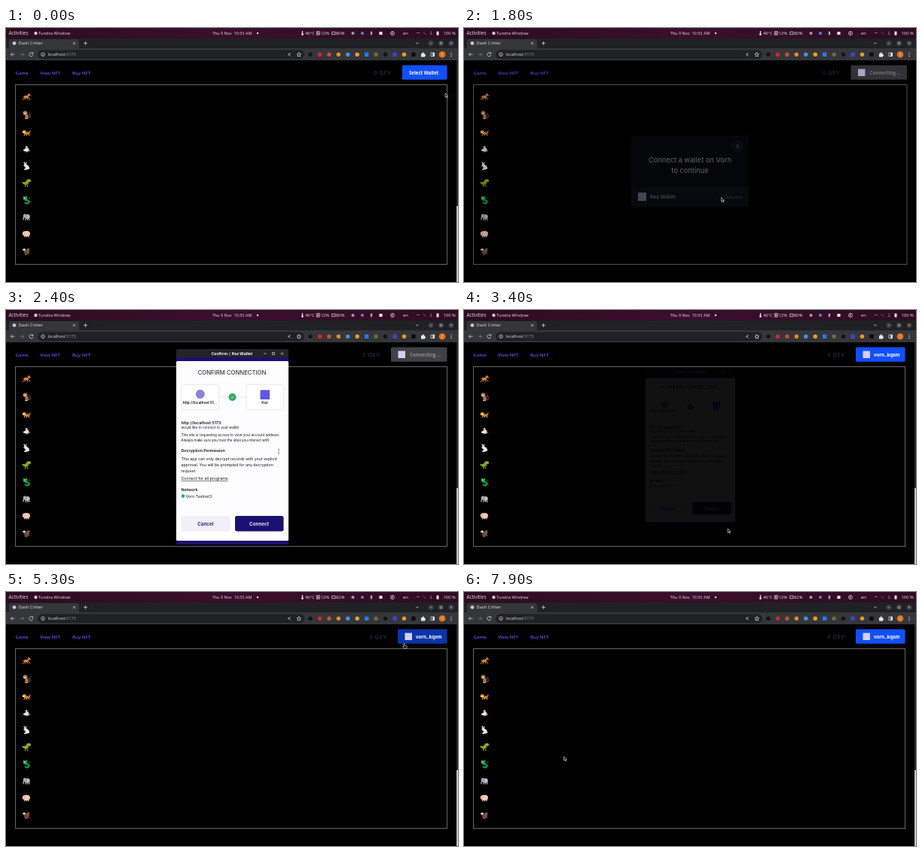
These frames come from a looping animation (600 by 338 pixels, 8 s). An HTML page:

```html
<!DOCTYPE html>
<html lang="en">
<head>
<meta charset="utf-8">
<title>Wallet demo</title>
<style>
html, body { margin: 0; width: 100%; height: 100%; overflow: hidden; background: #000; }
svg { display: block; width: 100vw; height: 100vh; }
text { font-family: "Open Sans", "Noto Sans", sans-serif; font-size: 5.8px; fill: #e6e0e4; white-space: pre; }
.ui text { font-family: Inter, sans-serif; font-size: 5.3px; fill: #15151c; }
.ui .small { font-size: 4.6px; }
.ui .body { font-size: 5.2px; }
.ui .w { fill: #fff; }
.b { font-weight: 600; }
.mid { text-anchor: middle; }
.end { text-anchor: end; }
.line { fill: none; stroke: #d4d4d8; stroke-width: .8; }
#nav text { font-size: 6.1px; font-weight: 600; fill: #5c58f4; }
</style>
</head>
<body>
<svg viewBox="0 0 600 338" preserveAspectRatio="none">
  <defs>
    <linearGradient id="panel"><stop stop-color="#2e0b22"/><stop offset=".5" stop-color="#3a0f2b"/><stop offset="1" stop-color="#2f0c24"/></linearGradient>
    <path id="controls" class="line" d="M-1.5 0h3M9.6-1.4h2.8v2.8h-2.8zM21.1-1.4l2.8 2.8m0-2.8l-2.8 2.8"/>
  </defs>

  <!-- page -->
  <rect width="600" height="338"/>
  <g id="nav">
    <text x="12.5" y="61.6">Game</text><text x="45" y="61.6">View NFT</text><text x="88" y="61.6">Buy NFT</text>
  </g>
  <rect id="frame" x="12.5" y="75.5" height="239" fill="none" stroke="#666"/>
  <g id="animals"></g>
  <g id="account">
    <text id="balance" class="b end" y="62" style="font-size:7px;letter-spacing:.7px;fill:#273040">0 QEV</text>
    <rect id="button" y="49.6" height="19.2" rx="1.6"/>
    <rect id="mark" y="54.5" width="9.5" height="9.5" fill="#d3cffa"/>
    <text id="label" y="61.5" style="font-size:6.1px;font-weight:700"></text>
  </g>
  <g id="scrollbar">
    <rect x="598" y="43" width="2" height="295" fill="#2a2a2a"/>
    <rect x="598" y="237" width="2" height="101" fill="#c4c4c4"/>
  </g>

  <!-- wallet picker -->
  <g id="modal" class="ui">
    <rect y="43" width="600" height="295" opacity=".62"/>
    <rect x="222" y="143" width="156" height="96" rx="3" fill="#10141f"/>
    <rect id="row" x="222" y="212" width="156" height="25" fill="#1a1f2e"/>
    <circle cx="363.5" cy="157.5" r="7.5" fill="#1c2133"/>
    <path class="line" d="M361.2 155.2l4.6 4.6m0-4.6l-4.6 4.6"/>
    <text x="300" y="178.6" class="mid w" style="font-size:9.2px;font-weight:500">Connect a wallet on Vorn</text>
    <text x="300" y="192.6" class="mid w" style="font-size:9.2px;font-weight:500">to continue</text>
    <rect x="231" y="219" width="11" height="11" fill="#d3cffa"/>
    <text x="247" y="227" class="w" style="font-size:6.8px">Kez Wallet</text>
    <text x="369" y="226.5" class="end" style="fill:#8b8e96">Detected</text>
  </g>

  <!-- popup while loading -->
  <g id="blank">
    <path d="M228 312V63q0-2 2-2h140q2 0 2 2v249z" fill="#2b2e35"/>
    <path d="M228 70.5V63q0-2 2-2h140q2 0 2 2v7.5z" fill="#202124"/>
    <text x="231.5" y="67.8" style="font-size:5.3px;font-weight:700;fill:#fff">_crx_nebnhfamliijlghikdgcigoebonmoi...</text>
    <use href="#controls" x="342.5" y="65.8"/>
  </g>

  <!-- popup with the request -->
  <g id="confirm" class="ui">
    <path d="M226 64V54q0-2 2-2h145q2 0 2 2v10z" fill="#242427"/>
    <text x="300" y="60" class="mid w" style="font-family:'Open Sans',sans-serif;font-weight:700">Confirm | Kez Wallet</text>
    <use href="#controls" x="344" y="58"/>
    <rect x="226" y="63" width="149" height="249" fill="#1c1170"/>
    <rect x="226" y="68" width="149" height="239" rx="1.5" fill="#fdfdff"/>
    <text x="300" y="86.3" class="mid" style="font-size:7.75px">CONFIRM CONNECTION</text>
    <g fill="#fff" stroke="#dedee6" stroke-width=".7">
      <rect x="232.8" y="99.3" width="50" height="33.5" rx="2.5"/><rect x="319" y="99.3" width="50" height="33.5" rx="2.5"/>
      <path d="M283 116h36"/>
    </g>
    <circle cx="257.8" cy="112" r="6" fill="#8a83d8"/>
    <text x="257.5" y="124.6" class="mid b" style="font-size:4.7px">http://localhost:51...</text>
    <rect x="337.5" y="106.5" width="12.5" height="12.5" fill="#6355e0"/>
    <text x="343.5" y="124.6" class="mid b" style="font-size:4.7px">Kez</text>
    <circle cx="300.5" cy="116" r="5" fill="#2fa866"/>
    <path d="M298.6 116.2l1.4 1.4 2.4-2.8" fill="none" stroke="#fff" stroke-width=".8"/>
    <text x="232.5" y="151.6" class="b">http://localhost:5173</text>
    <text x="232.5" y="158.2" class="small">would like to connect to your wallet</text>
    <text x="232.5" y="168" class="small">This site is requesting access to view your account address.</text>
    <text x="232.5" y="175" class="small">Always make sure you trust the sites you interact with.</text>
    <text x="232.5" y="189" class="b">Decryption Permission</text>
    <text x="232.5" y="200" class="body">This app can only decrypt records with your explicit</text>
    <text x="232.5" y="208" class="body">approval. You will be prompted for any decryption</text>
    <text x="232.5" y="216" class="body">request.</text>
    <text x="232.5" y="226.3" text-decoration="underline">Connect for all programs</text>
    <text x="232.5" y="240.8" class="b">Network</text>
    <circle cx="235" cy="247.6" r="2.3" fill="#2b9fb0"/>
    <text x="238.8" y="249.5" class="body">Vorn Testnet3</text>
    <rect x="232.5" y="274" width="65" height="20.5" rx="2.5" fill="#f0f0f6"/>
    <text x="264.8" y="286.7" class="mid b" style="font-size:6.3px;fill:#1c1170">Cancel</text>
    <rect id="ok" x="304" y="274" width="64.5" height="20.5" rx="2.5"/>
    <text x="336" y="286.7" class="mid b w" style="font-size:6.3px">Connect</text>
  </g>

  <!-- desktop panel -->
  <rect width="600" height="14" fill="url(#panel)"/>
  <text x="3.5" y="9" style="font-size:6.3px">Activities</text>
  <circle cx="39.5" cy="7" r="2.2" fill="#cfc8cc"/>
  <text x="43" y="9">Tundra Window</text>
  <text x="300" y="9" class="mid" style="font-size:5.5px">Thu 9 Nov  10:53 AM</text>
  <circle cx="334" cy="7" r="1.2" fill="#fff"/>
  <path d="M393.5 4v4" stroke="#e6e0e4" stroke-width="1.3"/><circle cx="393.5" cy="8.6" r="1.4" fill="#e6e0e4"/>
  <text x="397" y="9">46°C</text>
  <path class="line" d="M412.3 4.6h4v4.6h-4zm1.3 1.5h1.4v1.6h-1.4z"/>
  <text x="417.5" y="9">12%</text>
  <path class="line" d="M432.6 5.2h4.4v3.4h-4.4z"/>
  <text id="memory" x="438" y="9"></text>
  <g id="tray"></g>
  <path class="line" d="M483.6 5.7l2.6 2.4-1.3 1.3V4.6l1.3 1.2-2.6 2.5"/>
  <circle class="line" cx="513" cy="7" r="2.5"/><path class="line" d="M513.6 5.5q-1-.2-1 .8v2.2m-.7-1.4h1.6"/>
  <text x="527" y="9">en</text>
  <path d="M545 6.5h4m5-1l3 3m7.2-4.2v3.4m-1.6 0q1.6 2 3.2 0" class="line" opacity=".6"/>
  <path d="M571.5 4.6h3v5h-3z" fill="#e6e0e4"/>
  <text x="580.5" y="9">100 %</text>

  <!-- browser -->
  <rect y="14" width="600" height="14" fill="#202124"/>
  <path d="M2 28q2 0 2-2v-8q0-3 3-3h87q3 0 3 3v8q0 2 2 2z" fill="#35363a"/>
  <rect y="27" width="600" height="16" fill="#35363a"/>
  <circle cx="11" cy="20.3" r="2.4" fill="#c9c9cd"/>
  <text x="16.5" y="22.4">Dash Critter</text>
  <path class="line" d="M89 18.8l3 3m0-3l-3 3M103 20.3h5m-2.5-2.5v5M544.3 19.5l1.7 1.7 1.7-1.7"/>
  <g fill="#3c3d41"><circle cx="564" cy="20.3" r="3.6"/><circle cx="577.5" cy="20.3" r="3.6"/><circle cx="591" cy="20.3" r="3.6"/></g>
  <path class="line" opacity=".7" d="M562.7 20.6h2.6M576.3 19.1h2.4v2.4h-2.4zM589.8 19.1l2.4 2.4m0-2.4l-2.4 2.4"/>
  <path class="line" d="M11.5 35.2h-5m2-2.2l-2.2 2.2 2.2 2.2M35.6 34a2.5 2.5 0 1 0 .2 2M35.8 32.4v1.8h-1.8"/>
  <path class="line" opacity=".4" d="M18.5 35.2h5m-2-2.2l2.2 2.2-2.2 2.2"/>
  <rect x="42" y="29.2" width="354" height="12" rx="6" fill="#202124"/>
  <circle class="line" cx="49" cy="35.2" r="2.3"/><path class="line" d="M49 34.8v1.6"/>
  <text x="55.5" y="37.3" style="font-size:5.5px">localhost<tspan fill="#9a9ca1">:5173</tspan></text>
  <path class="line" d="M377.6 33.4l-3.2 1.8 3.2 1.8M388.8 32.4l.8 2 2 .2-1.5 1.4.4 2-1.7-1-1.7 1 .4-2-1.5-1.4 2-.2z"/>
  <g id="addons"></g>
  <path d="M551 34h1.6q0-1.8 1.1-1.8t1.1 1.8h1.2v1.4q1.2 0 1.2 1t-1.2 1v1.2h-5z" fill="#e6e6e8"/>
  <path class="line" d="M564 33h4.6v4.6H564z"/><path d="M566.4 33h2.2v4.6h-2.2z" fill="#eee"/>
  <circle cx="579" cy="35.2" r="4.3" fill="#e8701a"/><text x="579" y="37" class="mid" style="font-size:5px">C</text>
  <path d="M591 32.5v6" stroke="#ddd" stroke-width="1.1" stroke-dasharray="1.1 1.2"/>

  <g id="cursor" fill="#111" stroke="#fff" stroke-width=".55">
    <path d="M0 0v5.2l1.3-1.1 1 2.1.9-.4-1-2H4z"/>
    <path d="M-.6 0q.6-.8 1.2 0v2l2.6.7q.8.3.6 1.2l-.5 2.3H0l-2-2.4q.2-1 1.4 0z"/>
    <path d="M-1.2-2.8h2.4M0-2.8v5.6m-1.2 0h2.4" stroke="#555"/>
  </g>
</svg>
<script>
const $ = id => document.getElementById(id);
const set = (id, attrs) => { for (const k in attrs) $(id).setAttribute(k, attrs[k]); };
const show = (id, opacity) => set(id, { opacity: +opacity, visibility: opacity > 0 ? 'visible' : 'hidden' });
const ramp = (t, a, b) => Math.min(1, Math.max(0, (t - a) / (b - a)));
const within = (t, a, b) => t >= a && t < b;

// Small figures, each drawn around its own centre
const shape = (d, fill) => `<path d="${d}" fill="${fill}"/>`;
const stroke = (d, color, w = .8) => `<path d="${d}" fill="none" stroke="${color}" stroke-width="${w}"/>`;
const oval = (x, y, rx, ry, fill) => `<ellipse cx="${x}" cy="${y}" rx="${rx}" ry="${ry}" fill="${fill}"/>`;
const animals = [
  [91.5, stroke('M2 1l2.4 1 .4 2M1 1.5l1.6 2.8M-2 1l-2 1.6-1 2M-2 1l.4 3.4', '#c07a3a', 1) + oval(-.2, .2, 3.4, 1.9, '#cf8546') + shape('M6-1.4L4-4.6 1.6-3.4V0l2-1.4 1.4.6z', '#cf8546') + stroke('M3.6-4.4Q2-3.6 1-1.4M-3.2-.6q-2-.4-2.6 1.6', '#6b3518', .9)],
  [115.5, stroke('M2.6 4q3.4 0 2.4-3t-1-3.4', '#a5714a', .9) + oval(.5, 2, 2.4, 3, '#a5714a') + oval(-1.5, -2.5, 3, 2.7, '#a5714a') + oval(-1.8, -2, 1.9, 1.7, '#e6bd95') + oval(0, 5, 2.3, .8, '#dcae84') + stroke('M-2.8-2.6h.6m1 0h.6', '#222')],
  [139.5, stroke('M3 0q2 0 2-3M-2 1l-1 3M0 1l.5 3M3 1l1 3', '#e48b2c', 1.1) + oval(1, .3, 3.8, 1.9, '#ee9a35') + oval(-2.8, -1.4, 2.5, 2.2, '#f0a344') + oval(-3.6, -.3, 1.2, .9, '#fff0d8') + stroke('M0-1.5v2.4M2-1.5v2.4M3.8-1v2M-3.3-3.2v.9', '#30200f', .6)],
  [161, stroke('M2.6 3q3 0 2-1.6', '#d8a9a0', .7) + oval(.8, 1, 2.7, 2.7, '#dedede') + oval(-2, 1.6, 2, 1.5, '#eee') + oval(.2, -2.6, 1.5, 1.6, '#d7b6b0') + stroke('M-2.6 1.2h.7M-2 4h4', '#777', .7)],
  [183.5, stroke('M-2-2l-1-3.4M-.8-2L-.2-5', '#f1f1f1', 1.2) + oval(1, 2, 2.5, 2.9, '#e4e4e4') + oval(-1.4, -.8, 2.1, 1.9, '#f8f8f8') + oval(3.3, 3, 1, 1, '#fff') + oval(-1.4, 4.6, 2, .8, '#fff') + stroke('M-2.4-1h.7', '#222')],
  [206, stroke('M-.8 1.6l-1 3.2h1.6M1 1.6l.4 3.2h1.4M2 0l1.6.9', '#71951c', 1.1) + shape('M6-1.4v-2l-1-1.2-3-.2Q.2-4.4 0-2.4q-1.6 2.6-6 1.2Q-4.6 2.8 0 2.8q2.2-.4 2.4-3.4z', '#86a823') + stroke('M3.4-3.6h.8', '#fff', .7)],
  [229, stroke('M-2 3q4 3 5 0T0 0t1-4', '#17924c', 2.4) + oval(-1.6, -2.4, 2.8, 2.4, '#20a659') + stroke('M-3-4l-1-1.4M0-4l1.3-1.4M3.8-3l1.5 1M4 2l1.5 1', '#67b63c', .9) + oval(-2.4, -2.8, .6, .6, '#fff') + stroke('M-4-.8h3', '#d44', .6)],
  [251.5, stroke('M-1 1v3.6M1.4 1v3.6M3.6 1v3.6', '#aab3b5', 1.2) + oval(1.4, -.6, 3.4, 3, '#b5bec0') + oval(-2, -1.6, 2.2, 2.6, '#a6b0b2') + stroke('M-3.2-.5q-1 2.4-1 4.4', '#bcc5c7', 1.2) + stroke('M-1.2-3.4q1.8 1.6.2 4', '#6d7678', .7)],
  [274, stroke('M-2.5 2.4v2.2M0 2.4v2.2M3 2.4v2.2', '#e8ac98', 1.3) + oval(.6, -.2, 4.4, 3.7, '#f4c6b2') + oval(-2.2, -.4, 3, 3, '#f9d4c3') + oval(-3, .4, 1.3, 1, '#e39b8b') + stroke('M-4-1.6h.6m1.8 0h.6', '#333', .6)],
  [297, shape('M-4.6-3l2.6 1.4L3.6-4.6Q5.4-1 3.4 1.4L5 4 2.4 3.4 0 5l-2-1z', '#6d4a3c') + stroke('M.6-1l3-2M1 1l2.4-1.6', '#a07962', .7) + oval(-2.8, -2.2, 1.7, 1.4, '#e9e1da') + shape('M-4.4-2.4l-1.2 1.2 1.6.2z', '#eeb32e') + stroke('M-1 4l-1 1.2M1 4.2v1.2', '#d89b30', .7)]
];
$('animals').innerHTML = animals.map(([y, art]) => `<g transform="translate(27 ${y})">${art}</g>`).join('');

// Round and square badges, evenly spaced
const badge = (x, y, r, fill, square) =>
  square ? `<rect x="${x - r}" y="${y - r}" width="${2 * r}" height="${2 * r}" rx=".6" fill="${fill}"/>` : oval(x, y, r, r, fill);
const addons = ['#141416', '#d8232a', '#c8502c', '#e88a26', '#4a90d8', '#e9a321', '#2878e0', '#6d6a3a', '#141417', '#4440d0', '#e69a2c', '#0c0c0e'];
$('addons').innerHTML = addons.map((c, i) => badge(404 + i * 12.45, 35.2, 2.7, c, [6, 9, 11].includes(i))).join('');
$('tray').innerHTML = badge(460.5, 7, 2.1, '#a99aa3') + badge(473, 7, 2.1, '#5c86b8') + badge(497.5, 7, 2.1, '#e8e0e4', true);

const path = [
  [0, 583, 87], [100, 582, 84], [500, 563, 60], [700, 563, 60], [1000, 549, 161], [1500, 330, 225], [1700, 330, 225],
  [2000, 365, 227], [2400, 362, 188], [2500, 362, 188], [3000, 342, 284], [3300, 344, 286], [3400, 350, 291], [3700, 350, 291],
  [4300, 365, 220], [4700, 365, 220], [5300, 528.5, 69], [5500, 524, 65], [5600, 524, 65], [5800, 552, 65], [6100, 552, 65],
  [6500, 575, 125], [6700, 575, 125], [7500, 150, 194], [7900, 132.5, 219], [8000, 132.5, 219]
];
function pointer(t) {
  const i = path.findIndex(p => p[0] > t);
  const [a, ax, ay] = path[i - 1], [b, bx, by] = path[i];
  const k = ramp(t, a, b);
  return [ax + (bx - ax) * k, ay + (by - ay) * k];
}

function draw(t) {
  const shift = within(t, 700, 2050) ? 2.5 : 0;
  const hover = within(t, 300, 700) || within(t, 5250, 6200);
  const connecting = within(t, 1700, 3400), ready = t >= 3400;
  const left = ready ? 520 : connecting ? 511 : 526;

  set('frame', { width: 573 + shift });
  show('scrollbar', !shift);
  set('account', { transform: `translate(${shift} 0)` });
  set('balance', { x: left - 14.5 });
  set('button', { x: left, width: 585.5 - left, fill: connecting ? '#404145' : hover ? '#0c34a8' : '#114ffb' });
  set('mark', { x: left + 9.5 });
  show('mark', connecting || ready);
  $('label').textContent = ready ? 'vorn..kqxm' : connecting ? 'Connecting ...' : 'Select Wallet';
  set('label', { x: left + (ready ? 24 : connecting ? 25 : 9) });
  $('label').style.fill = connecting ? '#8f9094' : '#fff';
  $('memory').textContent = t < 4000 ? '80%' : '82%';

  show('modal', ramp(t, 680, 900) * (1 - ramp(t, 1700, 1850)));
  show('row', t >= 1350);

  const open = ramp(t, 1850, 2000), scale = .85 + .15 * open;
  show('blank', t < 2150 ? open : 0);
  set('blank', { transform: `translate(300 186) scale(${scale}) translate(-300 -186)` });

  const closing = ramp(t, 3310, 3400);
  show('confirm', within(t, 2150, 3500) ? 1 - .935 * closing : 0);
  set('confirm', { transform: `translate(300.5 182) scale(${1 - .2 * closing}) translate(-300.5 -182)` });
  set('ok', { fill: within(t, 2950, 3400) ? '#2a1d8c' : '#1c1170' });

  const hand = hover || within(t, 1350, 1750) || within(t, 2950, 3350);
  const kind = hand ? 1 : within(t, 2250, 2700) ? 2 : 0;
  set('cursor', { transform: `translate(${pointer(t)})` });
  [...$('cursor').children].forEach((c, i) => c.setAttribute('visibility', i == kind ? 'visible' : 'hidden'));
}

let start;
function tick(now) {
  start ??= now;
  draw((now - start) % 8000);
  requestAnimationFrame(tick);
}
draw(0);
requestAnimationFrame(tick);
</script>
</body>
</html>
```
